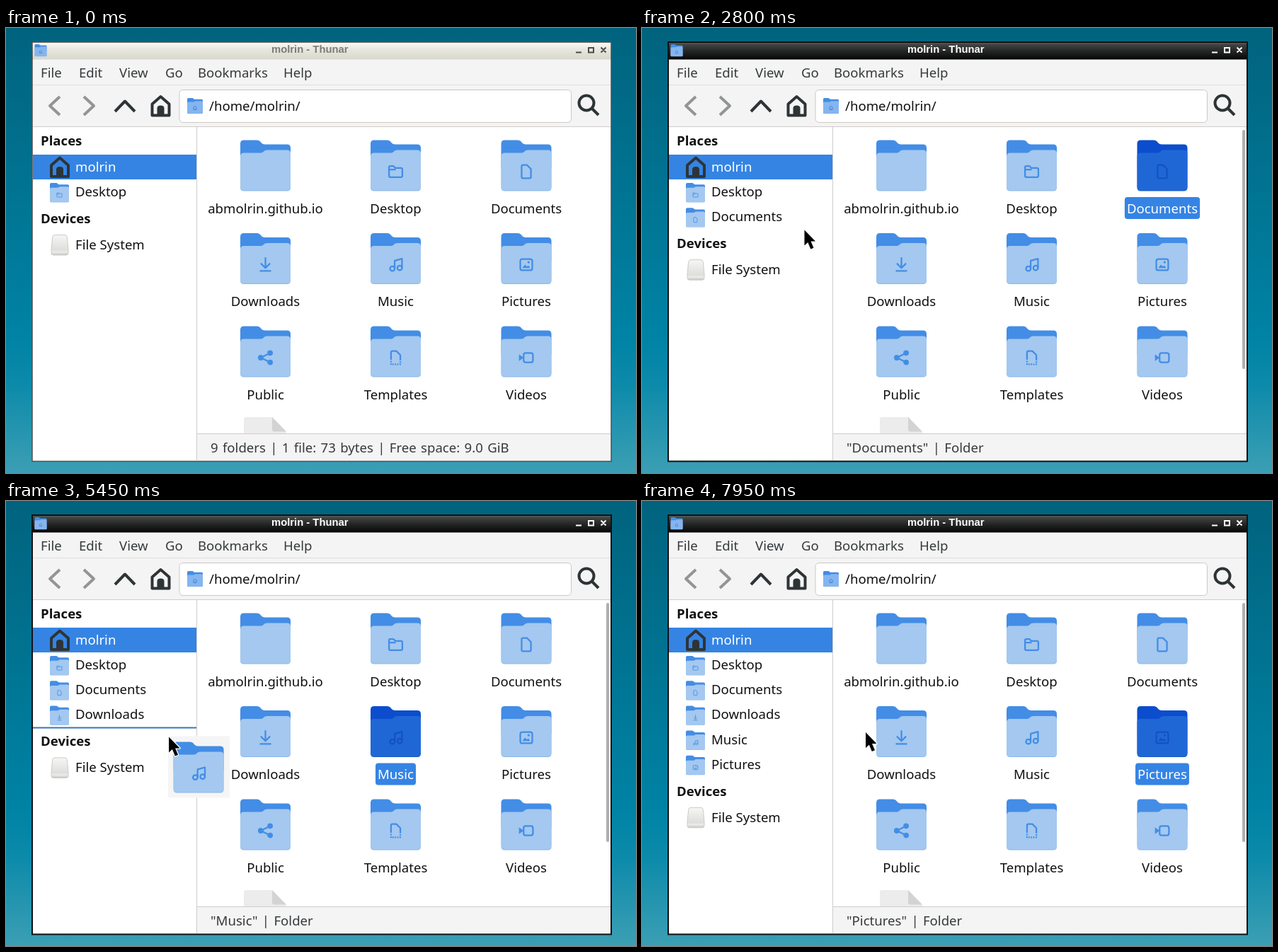
Animation, 890 px wide and 629 px high, one loop 8 s. Source, as an HTML page:

```html
<!DOCTYPE html>
<html lang="en">
<head>
<meta charset="utf-8">
<title>File manager</title>
<style>
html, body { margin: 0; width: 100%; height: 100%; overflow: hidden; }
svg { display: block; width: 890px; height: 629px; }
text { font: 18.6px "Noto Sans", sans-serif; fill: #111; white-space: pre; }
.bold { font-weight: 700; }
.dim { fill: #353a3c; }
.status { word-spacing: 1.5px; }
.line { stroke: #cfcdcb; }
.icon { fill: none; stroke: #2e3436; stroke-width: 4; stroke-linejoin: round; }
.title { font: bold 14.8px "Liberation Sans", Arial, sans-serif; fill: #7c7c76; }
.buttons { fill: none; stroke: #4c4c48; stroke-width: 2; }
.frame { fill: none; stroke: #4b5254; stroke-width: 1.5; }
.active .title { fill: #fff; }
.active .buttons { stroke: #fff; }
.active .bar { fill: url(#barOn); }
.active .frame { stroke: #101214; stroke-width: 2; }
.folder { --back: #438de6; --front: #a4c8ef; --edge: #8db8ec; --ink: #438de6; }
.small .folder { --front: #84b5ef; --ink: #2f76d2; }
.hover { --back: #57a4fd; --front: #bfecff; --edge: #a5d6ff; --ink: #579fee; }
.sel { --back: #0c4dcd; --front: #2067d6; --edge: #185bc9; --ink: #1452c0; }
.glyph { fill: none; stroke: var(--ink); stroke-width: 2.4; stroke-linejoin: round; }
.glyph .solid { fill: var(--ink); }
.tag { fill: none; }
.sel .tag { fill: #3584e4; }
.sel text { fill: #fff; }
#cursor { stroke: #fff; stroke-width: 2.4; stroke-linejoin: round; paint-order: stroke; }
</style>
</head>
<body>
<svg id="stage" viewBox="0 0 890 629"></svg>
<script>
const USER = 'molrin';
const LOOP = 8000;
const ROW = 35.2;
const $ = id => document.getElementById(id);

// Glyphs are drawn around (0, 0)
const paperTop = 'M-7 2V-8q0-2 2-2h6l6 6V2';
const glyphs = {
  none: '',
  home: '<path d="M-9-1L0-9L9-1M-7-2V9H7V-2M0 9V3"/>',
  Desktop: '<path d="M-10-6.500q0-2 2-2h4.500l3 3h8.500q2 0 2 2v10q0 2-2 2h-16q-2 0-2-2zM-10-3h10"/>',
  Documents: `<path d="${paperTop}V8q0 2-2 2h-10q-2 0-2-2V2"/>`,
  Downloads: '<path d="M0-11V5M-7-2L0 5L7-2M-8.500 9.500h17"/>',
  Music: '<circle cx="-5" cy="6" r="3.500"/><circle cx="6" cy="5" r="3.500"/><path d="M-1.500 6V-6L9.500-9V5"/>',
  Pictures: '<rect x="-9" y="-8.500" width="18" height="17" rx="3"/><path class="solid" stroke="none" d="M-6 5l4-5 3 3 2-2 3 4zM2-5h3v3h-3z"/>',
  Public: '<path d="M7-7L-7 0L7 7"/><g class="solid"><circle cx="-7" r="3"/><circle cx="7" cy="-7" r="3"/><circle cx="7" cy="7" r="3"/></g>',
  Templates: `<path d="${paperTop}"/><path stroke-dasharray="2 1.600" d="M7 2V10H-7V2"/>`,
  Videos: '<rect x="-4" y="-7" width="14" height="14" rx="3"/><path class="solid" stroke="none" d="M-11-5L-4 0L-11 5z"/>'
};

const folder = (x, y, glyph, size = 71) => `
  <g class="folder" transform="translate(${x} ${y}) scale(${size / 71})">
    <path fill="var(--back)" d="M0 40V5q0-5 5-5h18q4 0 6 3t6 3h31q5 0 5 5v29z"/>
    <path fill="var(--edge)" d="M0 40H71V67q0 5-5 5H5q-5 0-5-5z"/>
    <path fill="var(--front)" d="M0 23q0-5 5-5h24q2.500 0 4-2t5-2h28q5 0 5 5V66q0 5-5 5H5q-5 0-5-5z"/>
    <g class="glyph" transform="translate(35.500 44.500) scale(.94)">${glyphs[glyph]}</g>
  </g>`;

const text = (x, y, str, cls = '') => `<text x="${x}" y="${y}" class="${cls}">${str}</text>`;
const rect = (x, y, w, h, fill, more = '') =>
  `<rect x="${x}" y="${y}" width="${w}" height="${h}" fill="${fill}" ${more}/>`;
const line = d => `<path class="line" d="${d}"/>`;
const house = (x, y) => `<g class="icon" transform="translate(${x} ${y})">
  <path d="M-12 28V12L0 1.500L12 12V28z"/><path stroke="none" fill="#2e3436" d="M-5 29V18q0-4 5-4t5 4V29z"/></g>`;
const gradient = (id, ...stops) => `<linearGradient id="${id}" x2="0" y2="1">${
  stops.map(([at, color]) => `<stop offset="${at}" stop-color="${color}"/>`).join('')}</linearGradient>`;

const names = [`ab${USER}.github.io`, 'Desktop', 'Documents', 'Downloads', 'Music',
  'Pictures', 'Public', 'Templates', 'Videos'];
const items = names.map((name, i) => ({
  name, x: [331, 515, 699.5][i % 3], y: [158.5, 290, 421.500][i / 3 | 0]
}));
const menu = [['File', 49], ['Edit', 103], ['View', 160], ['Go', 225], ['Bookmarks', 271], ['Help', 392]];

$('stage').innerHTML = `
  <defs>
    ${gradient('desk', [0, '#01637e'], [.7, '#0083a5'], [.8, '#0c8aaa'], [1, '#3c9fb4'])}
    ${gradient('barOff', [0, '#fbfbf7'], [.4, '#e9e8df'], [1, '#d8d7cb'])}
    ${gradient('barOn', [0, '#626361'], [.15, '#414341'], [.55, '#222423'], [1, '#060606'])}
    ${gradient('disk', [0, '#f6f6f5'], [.75, '#dededc'], [.85, '#ececea'], [1, '#c4c4c1'])}
    <clipPath id="view"><path d="M270 140H854V573H270z"/></clipPath>
  </defs>
  ${rect(0, 0, 890, 629, 'url(#desk)')}
  <g id="window">
    ${rect(37, 20, 818, 592, '#f5f4f4')}
    ${rect(37, 20, 818, 24.5, 'url(#barOff)', 'class="bar"')}
    <g class="small">${folder(40.500, 23, 'home', 17)}</g>
    ${text(375, 35, USER + ' - Thunar', 'title')}
    <path class="buttons" d="M805 34.500h8M823 28h7v6.500h-7zM840.500 27.500l7 7M847.500 27.500l-7 7"/>
    ${menu.map(([name, x]) => text(x, 70, name, 'dim')).join('')}
    <path stroke="#e1dfde" d="M38 80.500H854"/>
    <path class="icon" style="stroke:#929595" d="M76 97L62 110L76 123M110 97L124 110L110 123"/>
    <path class="icon" d="M154 118L168 103.500L182 118"/>
    ${house(218.500, 95.500)}
    ${rect(245, 87.500, 553.500, 46, '#fff', 'rx="5" stroke="#cdc8c4"')}
    <g class="small">${folder(256, 99, 'home', 22)}</g>
    ${text(287, 117, `/home/${USER}/`)}
    <g class="icon"><circle cx="820" cy="106" r="10.500"/><path d="M828 114L837 123"/></g>
    ${rect(38, 139, 816, 434, '#fff')}
    ${rect(38, 573, 231, 38, '#fff')}
    ${line('M38 139.500H854M269.500 139V611M270 573.500H854')}
    ${text(49, 166, 'Places', 'bold')}
    ${rect(38, 179, 231, 35, '#3584e4')}
    ${house(76, 182)}
    <text x="98" y="203" style="fill:#fff">${USER}</text>
    <g id="places"></g>
    <g id="devices">
      ${text(49, 276, 'Devices', 'bold')}
      <path fill="url(#disk)" stroke="#cbcbc8" d="M69 292.500H83q3 0 3.300 3L88 313v5q0 3-3 3H67q-3 0-3-3v-5l1.700-17.500q.3-3 3.300-3z"/>
      ${text(98, 313, 'File System')}
    </g>
    <path id="dropLine" stroke="#3a74b8" stroke-width="2"/>
    <g clip-path="url(#view)">
      ${items.map((it, i) => `<g id="item${i}">${folder(it.x, it.y, i ? it.name : 'none')}
        <rect class="tag" y="${it.y + 80.500}" height="31" rx="4"/>
        <text x="${it.x + 35.500}" y="${it.y + 103}" text-anchor="middle">${it.name}</text></g>`).join('')}
      <path fill="#ececec" d="M336 573V553q0-3 3-3H376L396 571V573z"/>
      <path fill="#d3d3d3" d="M376 550L396 570.500H379q-3 0-3-3z"/>
    </g>
    ${rect(848, 144, 4, 338, '#b0b0af', 'id="scroll" rx="2"')}
    <text id="status" class="dim status" x="289" y="600"></text>
    <rect class="frame" x="37" y="20" width="818" height="592.500"/>
  </g>
  <g id="drag"></g>
  <path id="cursor" d="M1 1V23L5.800 18.500L9.800 28L14 26.200L10 17H16.500z"/>`;

items.forEach((it, i) => {
  it.node = $('item' + i);
  const width = it.node.querySelector('text').getComputedTextLength() + 6;
  const tag = it.node.querySelector('.tag');
  tag.setAttribute('x', it.x + 35.5 - width / 2);
  tag.setAttribute('width', width);
});

const actions = [
  { name: 'Documents', press: 1300, drag: 1400, drop: 2450 },
  { name: 'Downloads', press: 3350, drag: 3430, drop: 4100 },
  { name: 'Music', press: 5000, drag: 5100, drop: 5800 },
  { name: 'Pictures', press: 6550, drag: 6650, drop: 7650 }
];

// Pointer path: time, x, y
const path = [
  [550, 892, 400], [1150, 717, 217], [1350, 717, 217], [1950, 155, 258], [2200, 148, 256],
  [2450, 148, 256], [3250, 345, 326], [3380, 345, 326], [3550, 276, 333], [3900, 150, 296],
  [4120, 146, 293], [4850, 510, 336], [5000, 535, 333], [5080, 535, 333], [5600, 150, 332],
  [5850, 146, 329], [6250, 707, 291], [6500, 728, 322], [6620, 728, 322], [6800, 658, 335],
  [7200, 200, 392], [7450, 142, 364], [7650, 142, 364], [7950, 315, 326], [8000, 315, 326]
];

// Monotone cubic interpolation of one coordinate
function along(t, axis) {
  const slope = i => (path[i + 1][axis] - path[i][axis]) / (path[i + 1][0] - path[i][0]);
  const tangent = i => {
    if (i === 0 || i === path.length - 1) return 0;
    const a = slope(i - 1), b = slope(i);
    return a * b <= 0 ? 0 : 2 * a * b / (a + b);
  };
  const i = Math.max(0, path.findIndex(p => p[0] > t) - 1);
  const span = path[i + 1][0] - path[i][0];
  const u = (t - path[i][0]) / span, v = 1 - u;
  return path[i][axis] * (1 + 2 * u) * v * v + path[i + 1][axis] * u * u * (3 - 2 * u)
    + span * u * v * (tangent(i) * v - tangent(i + 1) * u);
}

function setHTML(id, html) {
  const node = $(id);
  if (node.markup !== html) node.innerHTML = node.markup = html;
}

function dragImage(name) {
  const wide = name === 'Downloads';
  return rect(0, 0, wide ? 96 : 87, 87, '#f6f5f5') + folder(7.5, 8, name)
    + (wide ? '<path stroke="#8ba6cf" stroke-width="1.500" d="M87 20V77"/>' : '');
}

function render(t) {
  const shown = t >= 550;
  const x = shown ? along(t, 1) : -99, y = shown ? along(t, 2) : -99;
  const selected = actions.filter(a => t >= a.press).pop();
  const held = actions.find(a => t >= a.drag && t < a.drop);
  const added = actions.filter(a => t >= a.drop);

  $('window').classList.toggle('active', !!selected);
  for (const it of items) {
    const sel = selected?.name === it.name;
    const over = !held && x > it.x - 7 && x < it.x + 78 && y > it.y - 4 && y < it.y + 112;
    it.node.setAttribute('class', sel ? 'sel' : '');
    it.node.firstElementChild.setAttribute('class', 'folder' + (sel ? ' sel' : over ? ' hover' : ''));
  }

  setHTML('places', ['Desktop', ...added.map(a => a.name)].map((name, i) =>
    folder(62, 219 + i * ROW, name, 27) + text(98, 238 + i * ROW, name)).join(''));
  $('devices').setAttribute('transform', `translate(0 ${added.length * ROW})`);
  $('dropLine').setAttribute('d', held && x < 269 ? `M38 ${250 + added.length * ROW}H269` : '');
  $('status').textContent = selected ? `"${selected.name}" | Folder`
    : '9 folders | 1 file: 73 bytes | Free space: 9.0 GiB';
  $('scroll').setAttribute('opacity', t < 850 ? 0 : 1);

  setHTML('drag', held ? dragImage(held.name) : '');
  for (const id of ['drag', 'cursor']) $(id).setAttribute('transform', `translate(${x} ${y})`);
}

const start = performance.now();
function tick() {
  render((performance.now() - start) % LOOP);
  requestAnimationFrame(tick);
}
tick();
</script>
</body>
</html>
```
